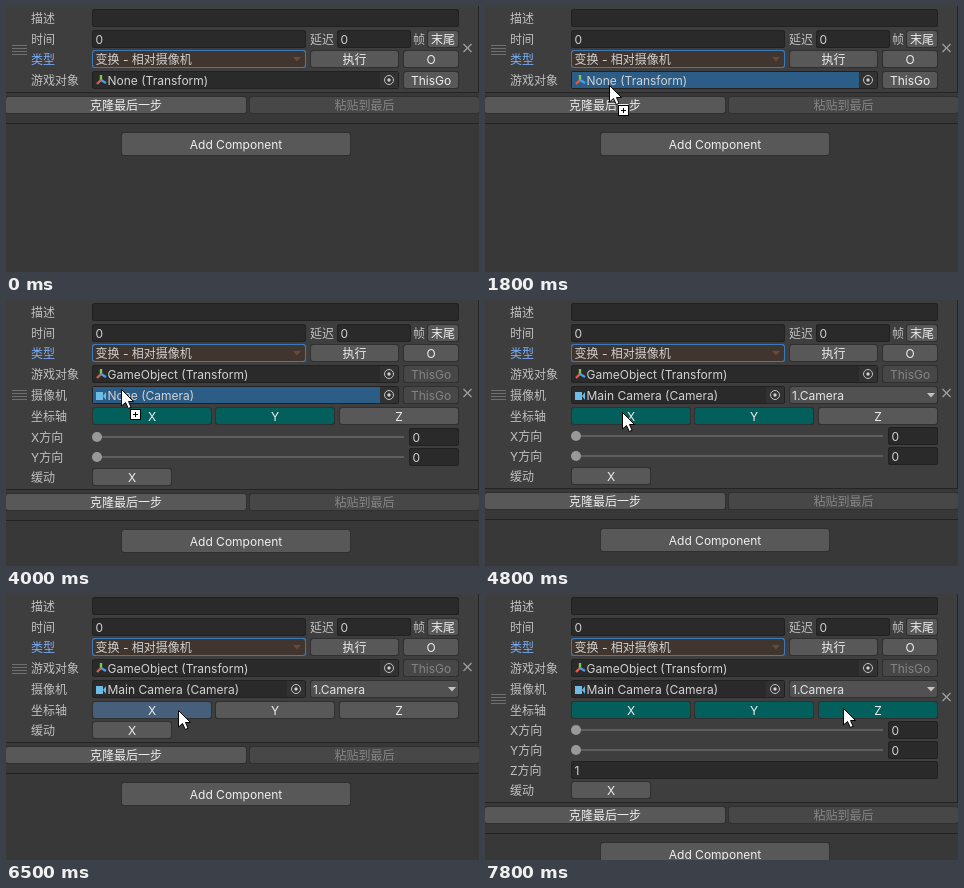
These frames come from a looping animation (473 px wide and 266 px high, 8000 ms). An HTML page with a canvas:

```html
<!DOCTYPE html>
<html lang="zh">
<head>
<meta charset="utf-8">
<style>
html, body { margin: 0; width: 473px; height: 266px; overflow: hidden; background: #383838; }
canvas { display: block; }
</style>
</head>
<body>
<canvas id="stage" width="473" height="266"></canvas>
<script>
const ctx = document.getElementById('stage').getContext('2d');
const LOOP = 8000, STEP = 100;
const FONT = '12px Inter, "Noto Sans CJK SC", "Noto Sans CJK", sans-serif';
const LABEL = '#c0c0c0', TEXT = '#d2d2d2', BRIGHT = '#eeeeee', FOCUS = '#3a79bb';
const BUTTON = '#585858', TEAL = '#035f5b', PRESSED = '#46607c';
const ROW = { note: 12, time: 33, type: 53, object: 74, camera: 95, axis: 116, extra: 136 };

// Pointer stops: time, x, y
const path = [
  [1400, 2, 24], [1800, 124, 79], [2200, 124, 79], [2400, 68, 53],
  [3600, 2, 15], [4100, 128, 98], [4500, 128, 98], [4800, 137, 112],
  [5600, 137, 112], [6000, 266, 115], [6100, 266, 115], [6400, 172, 116],
  [6600, 172, 116], [7100, 275, 118], [7200, 275, 118], [7600, 358, 114]
];

let pointer = null;

const within = (t, from, to) => t >= from && t < to;

function pointerAt(t) {
  if (!within(t, 1400, 2500) && t < 3600) return null;
  const next = path.findIndex(p => p[0] > t);
  const b = path[next < 0 ? path.length - 1 : next];
  const a = next < 0 ? b : path[next - 1];
  // Rest at the last stop before the pointer leaves
  if (t < 2500 && b[0] === 3600) return { x: a[1], y: a[2], drag: false };
  const k = b === a ? 1 : (t - a[0]) / (b[0] - a[0]);
  const e = k * k * (3 - 2 * k);
  return {
    x: Math.round(a[1] + (b[1] - a[1]) * e),
    y: Math.round(a[2] + (b[2] - a[2]) * e),
    drag: t < 2100 || within(t, 3600, 4300)
  };
}

function over(x0, x1, y) {
  return pointer && pointer.x >= x0 && pointer.x < x1 && Math.abs(pointer.y - y) < 9;
}

function rect(x, y, w, h, color) {
  ctx.fillStyle = color;
  ctx.fillRect(x, y, w, h);
}

function box(x0, x1, y0, y1, fill, border) {
  const round = (inset, color) => {
    ctx.fillStyle = color;
    ctx.beginPath();
    ctx.roundRect(x0 + inset, y0 + inset, x1 - x0 - 2 * inset, y1 - y0 - 2 * inset, 2.5);
    ctx.fill();
  };
  round(0, border);
  round(1, fill);
}

function line(points, color, width = 1) {
  ctx.strokeStyle = color;
  ctx.lineWidth = width;
  ctx.beginPath();
  points.forEach(([x, y]) => ctx.lineTo(x, y));
  ctx.stroke();
}

function shape(points, fill, stroke) {
  ctx.beginPath();
  points.forEach(([x, y]) => ctx.lineTo(x, y));
  ctx.closePath();
  ctx.fillStyle = fill;
  ctx.fill();
  if (stroke) {
    ctx.strokeStyle = stroke;
    ctx.lineWidth = 1;
    ctx.stroke();
  }
}

function disc(x, y, r, color) {
  ctx.fillStyle = color;
  ctx.beginPath();
  ctx.arc(x, y, r, 0, 7);
  ctx.fill();
}

function text(s, x, y, color = LABEL, align = 'left') {
  ctx.fillStyle = color;
  ctx.textAlign = align;
  ctx.fillText(s, x, y + 5);
}

function field(x0, x1, y, value = '', hover = false) {
  box(x0, x1, y - 9, y + 9, '#2a2a2a', hover ? '#656565' : '#212121');
  text(value, x0 + 3.5, y, TEXT);
}

function button(s, x0, x1, y, fill = BUTTON, color = BRIGHT) {
  box(x0, x1, y - 9, y + 9, fill, '#303030');
  text(s, (x0 + x1) / 2, y, color, 'center');
}

function disabledButton(s, x0, x1, y) {
  button(s, x0, x1, y, '#474747', '#858585');
}

function arrow(x, y, color) {
  shape([[x - 4, y - 2], [x + 4, y - 2], [x, y + 2.5]], color);
}

function gizmoIcon(y) {
  line([[95, y], [95, y - 5]], '#7ccb4a', 2.4);
  line([[95, y], [91, y + 4]], '#e05a4a', 2.4);
  line([[95, y], [100, y + 3]], '#4a9de0', 2.4);
}

function cameraIcon(y) {
  rect(90, y - 3, 7, 8, '#6dbce6');
  shape([[97, y + 1], [100, y - 3], [100, y + 5]], '#6dbce6');
}

function objectField(x1, y, value, icon) {
  const hover = over(86, x1, y), drop = hover && pointer.drag;
  field(86, x1, y, '', hover && !drop);
  if (drop) rect(87, y - 8, x1 - 106, 16, '#2c5d87');
  icon(y);
  text(value, 101.5, y, TEXT);
  rect(x1 - 19, y - 8, 18, 16, '#323232');
  ctx.strokeStyle = '#c4c4c4';
  ctx.lineWidth = 1;
  ctx.beginPath();
  ctx.arc(x1 - 10, y, 4.5, 0, 7);
  ctx.stroke();
  disc(x1 - 10, y, 1.7, '#d0d0d0');
}

function axisButton(s, x0, on, pressed) {
  const idle = over(x0, x0 + 120, ROW.axis) && !pointer.drag ? '#676767' : BUTTON;
  button(s, x0, x0 + 120, ROW.axis, on ? TEAL : pressed ? PRESSED : idle);
}

function slider(s, y) {
  text(s, 25, y);
  rect(91, y - 1, 307, 2, '#5e5e5e');
  disc(91, y, 5, '#999999');
  field(403, 453, y, '0');
}

function drawPointer({ x, y, drag }) {
  const outline = [[0, 0], [0, 16.5], [4, 13], [6.8, 19], [9.6, 17.8], [7, 12], [12, 12]];
  shape(outline.map(([dx, dy]) => [x + dx + .5, y + dy + .5]), '#ffffff', '#000000');
  if (!drag) return;
  rect(x + 9, y + 20, 11, 11, '#000000');
  rect(x + 10, y + 21, 9, 9, '#ffffff');
  rect(x + 12, y + 25, 5, 1, '#000000');
  rect(x + 14, y + 23, 1, 5, '#000000');
}

function drawFixedRows(t, filled) {
  const focused = !within(t, 900, 1400) && !within(t, 3200, 3600);
  text('描述', 25, ROW.note);
  field(86, 453, ROW.note, '', within(t, 100, 200));

  text('时间', 25, ROW.time);
  field(86, 300, ROW.time, '0');
  text('延迟', 304, ROW.time);
  field(331, 405, ROW.time, '0');
  text('帧', 407, ROW.time);
  button('末尾', 421, 453, ROW.time);

  text('类型', 25, ROW.type, focused ? '#7baefa' : LABEL);
  box(86, 300, ROW.type - 9, ROW.type + 9, '#40362f', focused ? FOCUS : '#303030');
  text('变换 - 相对摄像机', 89.5, ROW.type, TEXT);
  arrow(291, ROW.type, '#6b4a38');
  button('执行', 304, 393, ROW.type);
  button('O', 397, 453, ROW.type);

  text('游戏对象', 25, ROW.object);
  objectField(393, ROW.object, (filled ? 'GameObject' : 'None') + ' (Transform)', gizmoIcon);
  (filled ? disabledButton : button)('ThisGo', 397, 453, ROW.object);
}

// Draws the rows below the object field and returns the last row's centre
function drawCameraRows(t) {
  const linked = t >= 4300;
  const x = !within(t, 5100, 6600), y = !within(t, 6100, 7200), z = t >= 7800;

  text('摄像机', 25, ROW.camera);
  objectField(linked ? 300 : 393, ROW.camera, (linked ? 'Main Camera' : 'None') + ' (Camera)', cameraIcon);
  if (linked) {
    box(304, 453, ROW.camera - 9, ROW.camera + 9, '#515151', '#303030');
    text('1.Camera', 307, ROW.camera, '#e4e4e4');
    arrow(446, ROW.camera, '#c4c4c4');
  } else {
    disabledButton('ThisGo', 397, 453, ROW.camera);
  }

  text('坐标轴', 25, ROW.axis);
  axisButton('X', 86, x, within(t, 6500, 6600));
  axisButton('Y', 209, y, within(t, 7100, 7200));
  axisButton('Z', 333, z, within(t, 7700, 7800));

  let row = ROW.extra + (linked ? 0 : 1);
  if (x) { slider('X方向', row); row += 20; }
  if (y) { slider('Y方向', row); row += 20; }
  if (z) { text('Z方向', 25, row); field(86, 453, row, '1'); row += 20; }
  text('缓动', 25, row);
  button('X', 86, 166, row);
  return row;
}

function drawFooter(last) {
  const mid = Math.floor((last + 10) / 2);
  for (const dy of [-3, 0, 3, 6]) rect(6, mid + dy, 15, 1, '#707070');
  line([[457.5, mid - 4], [465.5, mid + 4]], '#a0a0a0', 1.2);
  line([[465.5, mid - 4], [457.5, mid + 4]], '#a0a0a0', 1.2);

  rect(0, last + 12, 473, 1, '#242424');
  button('克隆最后一步', -1, 241, last + 25);
  disabledButton('粘贴到最后', 243, 474, last + 25);
  rect(0, last + 43, 473, 1, '#222222');
  box(115, 345, last + 52, last + 76, BUTTON, '#303030');
  text('Add Component', 230, last + 64, BRIGHT, 'center');
}

function draw(now) {
  const t = Math.floor(now % LOOP / STEP) * STEP;
  const filled = t >= 2100;
  pointer = pointerAt(t);
  const extras = !within(t, 5100, 6600) + !within(t, 6100, 7200) + (t >= 7800);
  const bottom = filled ? ROW.extra + 20 * extras + (t < 4300) : ROW.object;

  rect(0, 0, 473, 266, '#383838');
  rect(0, 0, 472, bottom + 12, '#3e3e3e');
  rect(472, 0, 1, bottom + 12, '#242424');
  ctx.font = FONT;
  drawFixedRows(t, filled);
  drawFooter(filled ? drawCameraRows(t) : ROW.object);
  if (pointer) drawPointer(pointer);
}

const start = performance.now();
function tick() {
  draw(performance.now() - start);
  requestAnimationFrame(tick);
}
tick();
</script>
</body>
</html>
```
